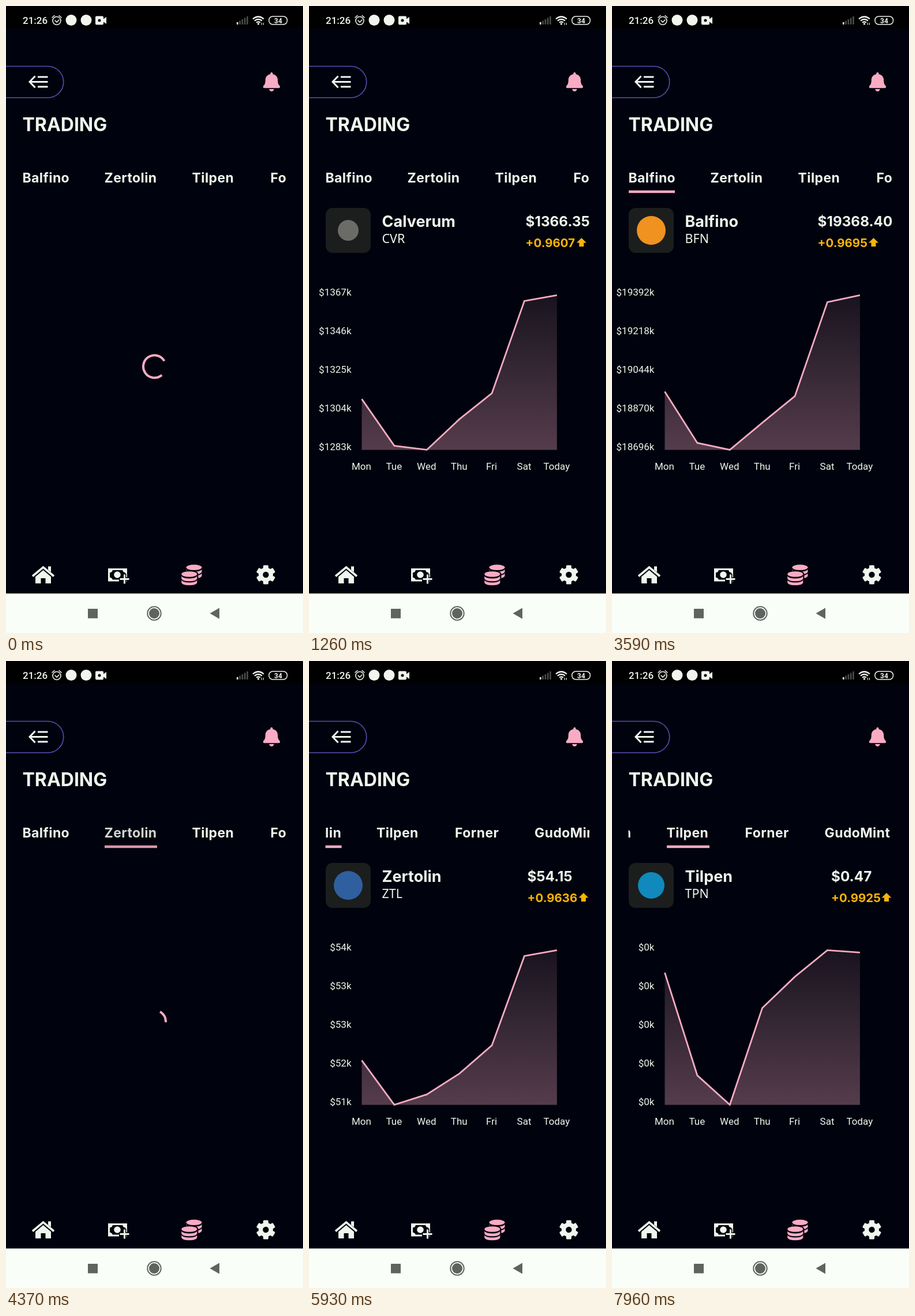
An HTML page that plays this animation: 515x1087 px, repeating every 8 s.

```html
<!DOCTYPE html>
<html lang="en">
<head>
<meta charset="utf-8">
<title>Trading</title>
<style>
  html, body { margin: 0; width: 100%; height: 100%; overflow: hidden; background: #00030d; }
  svg { display: block; width: 515px; height: 1087px; }
  text { fill: #f0f5ee; font-family: Inter, sans-serif; font-weight: 700; }
  .axis text { font: 400 17px Roboto, sans-serif; }
  .tab text { font-size: 23px; letter-spacing: .4px; }
  .pink { fill: #f9abc4; }
  .white { fill: #f0f5ee; }
  .back { fill: #00030d; }
  .line { fill: none; stroke: #f0f5ee; }
</style>
</head>
<body>
<svg viewBox="0 0 515 1087">
  <defs>
    <linearGradient id="shade" x1="0" y1="0" x2="0" y2="1">
      <stop offset="0" stop-color="#f9abc4" stop-opacity=".1"/>
      <stop offset="1" stop-color="#f9abc4" stop-opacity=".34"/>
    </linearGradient>
    <clipPath id="strip"><rect x="28.5" y="270" width="458" height="60"/></clipPath>
  </defs>
  <rect class="back" width="515" height="1087"/>
  <rect width="515" height="39" fill="#000"/>

  <!-- status bar -->
  <text x="29" y="31" style="font:500 17px Roboto,sans-serif">21:26</text>
  <g class="line" stroke-width="1.6" stroke-linecap="round">
    <circle cx="88" cy="25.5" r="7"/>
    <path d="M80 20l4-3.5M96 20l-4-3.5M85 25l3 3 4-4"/>
  </g>
  <circle class="white" cx="113" cy="24.5" r="9.5"/>
  <circle class="white" cx="139" cy="24.5" r="9.5"/>
  <path class="white" d="M157 17.5h10q2 0 2 2v3l5-3.500v12l-5-3.500v3q0 2-2 2h-10q-2 0-2-2v-11q0-2 2-2z"/>
  <circle cx="162" cy="25" r="2.5"/>
  <g id="signal"></g>
  <path class="line" stroke-width="2.2" d="M428 22.5q9.5-8 19 0M431 25.7q6.5-5.400 13 0M434 28.7q3.500-2.800 7 0"/>
  <circle class="white" cx="437.5" cy="31" r="1.7"/>
  <path class="line" stroke-width="1" d="M443.5 33v-4M446.5 29v4"/>
  <rect class="line" x="456" y="18" width="31.5" height="14" rx="6.5" stroke-width="1.5"/>
  <text x="472" y="29.5" text-anchor="middle" style="font:700 12px Roboto,sans-serif">34</text>

  <!-- header -->
  <path d="M-4 104.5H72.500a27 27 0 0 1 0 54.500H-4" fill="none" stroke="#5a4cb8" stroke-width="1.6"/>
  <path class="line" stroke-width="3" d="M55 123H72.500M42 131.500H72.500M55 140H72.500M50.500 121.500L41 131.500l9.500 10"/>
  <path class="pink" d="M460.500 115q2.200 0 2.200 3.300c5.400 1 8.500 5 8.500 10.200 0 6.500 2 8.500 3.600 10.200 1 1.400.2 3.500-1.800 3.500h-25c-2 0-2.800-2.100-1.800-3.500 1.600-1.700 3.600-3.700 3.600-10.200 0-5.200 3.100-9.200 8.500-10.200q0-3.300 2.200-3.300zM456.300 144h8.400q-.8 4-4.200 4t-4.200-4z"/>
  <text x="28.5" y="217" font-size="32">TRADING</text>

  <g clip-path="url(#strip)"><g id="tabs"></g></g>

  <g id="detail">
    <rect x="29" y="350" width="78" height="78" rx="12" fill="#1b1e1d"/>
    <circle id="badge" cx="68" cy="389"/>
    <text id="name" x="126.5" y="383" font-size="27"></text>
    <text id="code" x="126.5" y="411" style="font:400 21.5px 'Noto Sans',sans-serif"></text>
    <text id="price" y="382" font-size="24.3"></text>
    <text id="gain" y="418" font-size="20.5" style="fill:#fbb408"></text>
    <path id="arrow" d="M8.500 0l8.500 8.500h-4.500v6.500h-8v-6.500H0z" fill="#fbb408"/>
    <path id="area" fill="url(#shade)"/>
    <path id="curve" fill="none" stroke="#f9abc4" stroke-width="2.8"/>
    <g id="levels" class="axis" text-anchor="end"></g>
    <g id="days" class="axis" text-anchor="middle"></g>
  </g>

  <circle id="spinner" cx="257.5" cy="625" r="19.5" pathLength="360" fill="none"
    stroke="#f9abc4" stroke-width="4" stroke-linecap="square"/>

  <!-- tab bar -->
  <path class="line" stroke-width="3.6" d="M46 988.500L64.500 973 83 988.500"/>
  <path class="white" d="M73 971.500h5v10l-5-4zM64.500 978L78 989.500V1001H68.500v-9h-8v9H51V989.500z"/>
  <rect class="line" x="178.5" y="976.5" width="30" height="19.5" stroke-width="3"/>
  <path class="white" d="M179 977h6q0 5-6 5.500zM208 977h-6q0 5 6 5.500zM179 996h6q0-5-6-5.500z"/>
  <circle class="white" cx="193" cy="986" r="5.8"/>
  <path class="back" d="M196 990.500h6.500v-6.500h6v6.500h6v6h-6v6h-6v-4.500h-6.500z"/>
  <path class="line" stroke-width="3" d="M197.500 993.500h16M205.500 985.500v16"/>
  <g id="coins" class="pink"></g>
  <g id="gear" class="white" transform="translate(450.5 986)"></g>

  <!-- system buttons -->
  <rect y="1018.5" width="515" height="69" fill="#f9fef8"/>
  <g fill="#5f6461">
    <rect x="142" y="1045" width="17" height="16.5"/>
    <circle cx="257" cy="1053" r="9"/>
    <circle cx="257" cy="1053" r="11.7" fill="none" stroke="#5f6461" stroke-width="2"/>
    <path d="M353.500 1053l16.500-9.500v19z"/>
  </g>
</svg>
<script>
const LOOP = 8000;
const $ = id => document.getElementById(id);
const set = (el, attrs) => { for (const k in attrs) el.setAttribute(k, attrs[k]); return el; };
const add = (parent, tag, attrs, text = '') => {
  const el = set(document.createElementNS('http://www.w3.org/2000/svg', tag), attrs);
  el.textContent = text;
  return parent.appendChild(el);
};

const coins = [
  { name: 'Calverum', code: 'CVR', color: '#6b6c68', r: 18, price: '$1366.35', gain: '+0.9607', x: 375.5, arrow: 464,
    levels: [1367, 1346, 1325, 1304, 1283], ys: [681, 762, 769, 716, 671, 511, 501] },
  { name: 'Balfino', code: 'BFN', color: '#f0921f', r: 25, price: '$19368.40', gain: '+0.9695', x: 356.5, arrow: 445,
    levels: [19392, 19218, 19044, 18870, 18696], ys: [668, 757, 769, 722, 676, 513, 501] },
  { name: 'Zertolin', code: 'ZTL', color: '#2f5f9f', r: 25, price: '$54.15', gain: '+0.9636', x: 378.5, arrow: 467.5,
    levels: [54, 53, 53, 52, 51], ys: [692, 769, 751, 715, 666, 511, 501] },
  { name: 'Tilpen', code: 'TPN', color: '#1189bd', r: 23, price: '$0.47', gain: '+0.9925', x: 380, arrow: 467.5,
    levels: [0, 0, 0, 0, 0], ys: [540, 718, 769, 601, 547, 501, 505] }
];
const picks = [-700, 2205, 4190, 6690];
const loads = [[-632, 420], [2234, 3040], [4217, 5000], [6720, 7480]];
const scroll = { from: 5560, to: 6250, by: 228 };

const tabs = [
  { name: 'Balfino', x: 29, w: 80, presses: [[2050, 2205], [5350, 5560]] },
  { name: 'Zertolin', x: 171, w: 91, presses: [[4030, 4190]] },
  { name: 'Tilpen', x: 323, w: 74, presses: [[6540, 6690]] },
  { name: 'Forner', x: 459, w: 77, presses: [] },
  { name: 'GudoMint', x: 597, w: 114, presses: [] }
];
for (const tab of tabs) {
  tab.el = add($('tabs'), 'g', { class: 'tab' });
  add(tab.el, 'text', { x: tab.x - 0.5, y: 306 }, tab.name);
  tab.bar = add(tab.el, 'rect', { class: 'pink', x: tab.x, y: 319.7, width: tab.w, height: 4.5 });
}

const dayX = i => 91.5 + i * 56.4;
['Mon', 'Tue', 'Wed', 'Thu', 'Fri', 'Sat', 'Today'].forEach((d, i) =>
  add($('days'), 'text', { x: dayX(i) - 0.5, y: 804 }, d));
const levels = [0, 1, 2, 3, 4].map(i => add($('levels'), 'text', { x: 73.5, y: 501.5 + i * 67 }));

for (let i = 0; i < 5; i++)
  add($('signal'), 'rect', { x: 400 + i * 4.3, y: 28 - i * 2.5, width: 2.6, height: 4 + i * 2.5,
    fill: i ? '#4a4d4c' : '#f0f5ee' });

// one stack of coins: a lid with two curved bands beneath it
function stack(x, y) {
  add($('coins'), 'ellipse', { cx: x, cy: y, rx: 13.5, ry: 4.8 });
  for (const top of [y + 3.5, y + 10.5])
    add($('coins'), 'path', { d: `M${x - 13.5} ${top}q3 4 13.5 4t13.5 -4v4.5q-2 4.2 -13.5 4.2t-13.5 -4.2z` });
}
stack(326, 973.3);
add($('coins'), 'path', { class: 'back', d: 'M302 985a15.7 7 0 0 1 31.4 0v24h-31.4z' });
stack(317.8, 985);

for (let i = 0; i < 6; i++)
  add($('gear'), 'rect', { x: -4.5, y: -16.5, width: 9, height: 10, rx: 1.5, transform: `rotate(${i * 60})` });
add($('gear'), 'circle', { r: 12.5 });
add($('gear'), 'circle', { class: 'back', r: 5.2 });

const clamp = v => Math.min(1, Math.max(0, v));
const inOut = p => p < 0.5 ? 2 * p * p : 1 - 2 * (1 - p) ** 2;

// y of a cubic easing whose handles are flat, given its four x positions
function ease(x, a, b, c, d) {
  if (x <= a) return 0;
  if (x >= d) return 1;
  let lo = 0, hi = 1;
  for (let i = 0; i < 24; i++) {
    const s = (lo + hi) / 2, r = 1 - s;
    const at = a * r ** 3 + 3 * b * r * r * s + 3 * c * r * s * s + d * s ** 3;
    if (at < x) lo = s; else hi = s;
  }
  return lo * lo * (3 - 2 * lo);
}

function pressFade(t, [down, up]) {
  const dim = 0.8 * inOut(clamp((Math.min(t, up) - down) / 150));
  return 1 - dim * (1 - inOut(clamp((t - up) / 250)));
}

function drawSpinner(age) {
  const x = age % 1333 / 1333;
  const tail = 270 * ease(x, 0.5, 0.7, 0.6, 1);
  const head = 270 * ease(x, 0, 0.2, 0.1, 0.5);
  const turn = age * 0.162 + x * 90 + tail - 90;
  const len = Math.max(0.1, head - tail);
  set($('spinner'), { 'stroke-dasharray': `${len} ${360 - len}`, transform: `rotate(${turn} 257.5 625)` });
}

function drawDetail(picked, shown) {
  const top = coins[picked], chart = coins[shown];
  set($('badge'), { r: top.r, fill: top.color });
  $('name').textContent = top.name;
  $('code').textContent = top.code;
  $('price').textContent = top.price;
  $('gain').textContent = chart.gain;
  const x = Math.min(chart.x, top.x);
  set($('price'), { x });
  set($('gain'), { x });
  set($('arrow'), { transform: `translate(${chart.arrow + x - chart.x} 402)` });
  const line = 'M' + chart.ys.map((y, i) => `${dayX(i)} ${y + 0.4}`).join('L');
  set($('curve'), { d: line });
  set($('area'), { d: `${line}V769.4H${dayX(0)}z` });
  levels.forEach((el, i) => { el.textContent = `$${chart.levels[i]}k`; });
}

let last = '';
function render(t) {
  const picked = picks.filter(p => p <= t).length - 1;
  const shown = loads.filter(l => l[0] <= t).length - 1;
  const busy = t < loads[shown][1];

  const p = clamp((t - scroll.from) / (scroll.to - scroll.from));
  set($('tabs'), { transform: `translate(${-scroll.by * (1 - (1 - p) ** 3)} 0)` });
  tabs.forEach((tab, i) => {
    set(tab.el, { opacity: tab.presses.reduce((o, pr) => o * pressFade(t, pr), 1) });
    set(tab.bar, { visibility: picked === i + 1 ? 'visible' : 'hidden' });
  });

  set($('spinner'), { visibility: busy ? 'visible' : 'hidden' });
  set($('detail'), { visibility: busy ? 'hidden' : 'visible' });
  if (busy) drawSpinner(t - loads[shown][0]);
  const key = `${picked},${shown}`;
  if (key !== last) drawDetail(picked, shown);
  last = key;
}

const start = performance.now();
function tick() {
  render((performance.now() - start) % LOOP);
  requestAnimationFrame(tick);
}
render(0);
requestAnimationFrame(tick);
</script>
</body>
</html>
```
